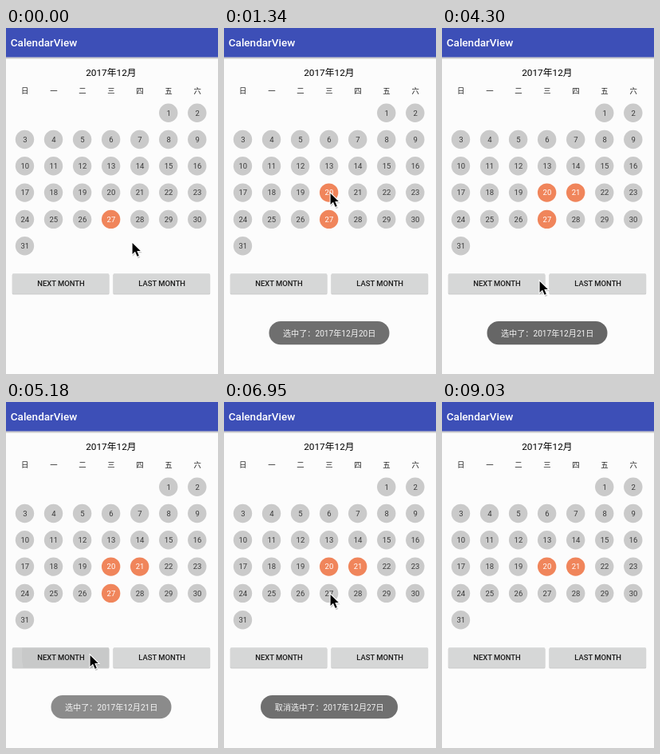
Write an HTML page that moves like this. It is 266 px wide and 433 px high and loops after 9.48 s.

```html
<!DOCTYPE html>
<html lang="zh-CN">
<head>
<meta charset="utf-8">
<title>CalendarView</title>
<style>
html, body { margin: 0; width: 100%; height: 100%; overflow: hidden; background: #fcfcfc; }
svg { display: block; width: 266px; height: 433px; }
text { font-family: Roboto, "Noto Sans CJK SC", "Noto Sans CJK JP", "Noto Sans CJK", sans-serif; text-anchor: middle; }
.head { font-size: 13.5px; font-weight: 500; fill: #fff; text-anchor: start; }
.month { font-size: 11.8px; fill: #000; }
.week { font-size: 9.4px; fill: #222; }
.day circle { fill: #cacaca; }
.day text { font-size: 9.5px; fill: #3a3a3a; }
.day.on circle { fill: #f0855b; }
.day.on text { fill: #fff; }
.button { font-size: 9.45px; font-weight: 500; fill: #1c1c1c; }
.toast { font-size: 10.15px; fill: #f4f4f4; }
</style>
</head>
<body>
<svg viewBox="0 0 266 433">
  <defs>
    <linearGradient id="shade" x2="0" y2="1">
      <stop stop-color="#000" stop-opacity=".3"/>
      <stop offset="1" stop-color="#000" stop-opacity="0"/>
    </linearGradient>
    <clipPath id="next"><rect x="8" y="307.2" width="121.2" height="25.2" rx="1.3"/></clipPath>
  </defs>
  <rect width="266" height="433" fill="#fcfcfc"/>
  <rect y="36.5" width="266" height="3" fill="url(#shade)"/>
  <rect width="266" height="36.5" fill="#3d4fb7"/>
  <text class="head" x="5.8" y="23">CalendarView</text>
  <text class="month" x="131.9" y="60">2017年12月</text>
  <g id="grid"></g>
  <g id="press" clip-path="url(#next)">
    <rect x="8" y="307" width="122" height="26" opacity=".03"/>
    <circle id="ripple" cx="105" cy="317" opacity=".035"/>
  </g>
  <g id="toast">
    <rect y="367" height="29.3" rx="14.65" fill="#666"/>
    <text class="toast" x="132.2" y="385.6"></text>
  </g>
  <g id="cursor">
    <path d="M0 0V16.5L4 13L6.6 19L9.6 17.7L7 12H12Z" opacity=".2" transform="translate(.8 1.2)"/>
    <path d="M.6 1V15L4 11.8L6.6 17.8L8.8 16.9L6.3 11H10.8Z" stroke="#fff" stroke-width="2" paint-order="stroke"/>
  </g>
</svg>
<script>
const LOOP = 9480, STEP = LOOP / 64;
const $ = id => document.getElementById(id);
const [pill, label] = $('toast').children;
const colX = c => 23.5 + 36.05 * c;

let html = '';
[...'日一二三四五六'].forEach((w, c) => html += `<text class="week" x="${colX(c) + .3}" y="82.3">${w}</text>`);
for (let d = 1; d <= 31; d++) {
  const cell = d + 4, x = colX(cell % 7), y = 106.2 + 33.3 * Math.floor(cell / 7);
  html += `<g class="day" id="day${d}"><circle cx="${x}" cy="${y}" r="11.7"/><text x="${x + .3}" y="${y + 3.3}">${d}</text></g>`;
}
['NEXT MONTH', 'LAST MONTH'].forEach((name, i) => {
  const x = 8 + 126.7 * i;
  html += `<rect x="${x - .3}" y="308" width="121.8" height="25.4" rx="1.5" opacity=".2"/>
    <rect x="${x}" y="307.2" width="121.2" height="25.2" rx="1.3" fill="#d6d7d7"/>
    <text class="button" x="${x + 61}" y="323.3">${name}</text>`;
});
$('grid').innerHTML = html;

// Cursor moves: first step, last step, x and y to reach
const moves = [[2, 6, 133, 206], [9, 13, 158, 206], [16, 19, 163, 318], [22, 24, 192, 317],
  [25, 30, 105, 316], [37, 41, 137, 249], [41, 42, 133, 240], [57, 60, 150, 396]];

const progress = (n, from, to) => Math.min(1, Math.max(0, (n - from) / (to - from)));
const mark = (day, on) => $('day' + day).classList.toggle('on', on);

function cursorAt(n) {
  let x = 158, y = 268;
  for (const [from, to, toX, toY] of moves) {
    const p = progress(n, from, to);
    x += (toX - x) * p;
    y += (toY - y) * p;
  }
  return [Math.round(x), Math.round(y)];
}

// Toast eases in and out over four steps
const shown = (n, from, to) => (1 - (1 - progress(n, from, from + 4)) ** 2) * (1 - progress(n, to, to + 4) ** 2);

function draw(ms) {
  const n = Math.floor(ms / STEP + .06);
  const cancel = n >= 42, date = cancel ? 27 : n >= 21 ? 21 : 20, width = cancel ? 172 : 151;
  mark(20, n >= 6);
  mark(21, n >= 13);
  mark(27, n < 43);

  label.textContent = `${cancel ? '取消' : ''}选中了：2017年12月${date}日`;
  pill.setAttribute('x', 132 - width / 2);
  pill.setAttribute('width', width);
  $('toast').setAttribute('opacity', shown(n, 6, 33) + shown(n, 43, 57));

  const press = progress(n, 32, 38);
  $('press').setAttribute('opacity', Math.sin(Math.PI * press));
  $('ripple').setAttribute('r', 170 * press);

  $('cursor').setAttribute('transform', `translate(${cursorAt(n)})`);
  $('cursor').setAttribute('visibility', n > 60 ? 'hidden' : 'visible');
}

const start = performance.now();
function tick() {
  draw((performance.now() - start) % LOOP);
  requestAnimationFrame(tick);
}
tick();
</script>
</body>
</html>
```
